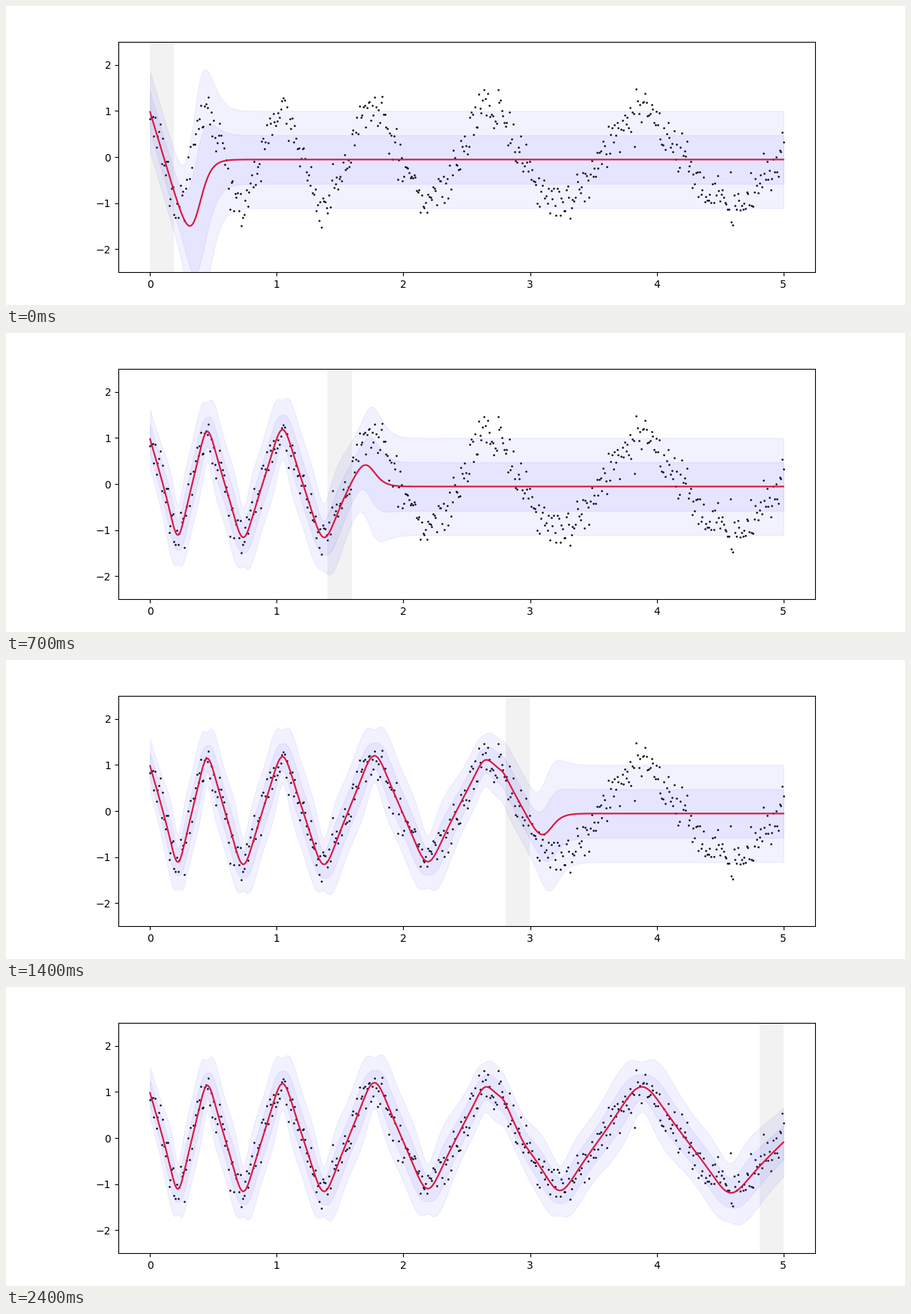
A matplotlib script that plays this animation: 1200 by 400 pixels, repeating every 2.5 s.

```python
import numpy as np
import matplotlib.pyplot as plt
from matplotlib.animation import FuncAnimation

FRAMES, BATCH = 25, 20

# Noisy hyperbolic chirp, 2.5 Hz slowing to 1 Hz at t = 2.5
rng = np.random.RandomState(1337)
x = np.linspace(0, 5, 500)
cycles = 2.5 * 5 / 3 * np.log(1 + x * 3 / 5)
y = np.cos(2 * np.pi * cycles) + 0.25 * rng.randn(500)

# Joints where one local linear expert hands over to the next
knots = np.array([
    (0, 0.98), (0.22, -1.11), (0.45, 1.14), (0.735, -1.16), (1.045, 1.18),
    (1.37, -1.16), (1.77, 1.2), (2.19, -1.1), (2.64, 1.1), (2.79, 0.82),
    (2.95, -0.1), (3.235, -1.14), (3.88, 1.11), (4.58, -1.19), (5, -0.09),
])
kx, ky = knots.T
length = np.diff(kx)
slope = np.diff(ky) / length
rate = 18 / (length[:-1] + length[1:])

PRIOR_MEAN, PRIOR_STD = -0.055, 0.527


def fit_slope(j, seen):
    """Ridge slope of the newest expert, anchored at its first joint."""
    use = (x >= kx[j]) & (np.arange(500) < seen)
    u, v = x[use] - kx[j], y[use] - ky[j]
    return u @ v / (u @ u + 0.025)


def predict(k):
    """Mean and deviation of the expert mixture after batch k."""
    seen = BATCH * (k + 1)
    edge = 0.2 * (k + 1)
    done = seen >= len(x)
    last = max(np.flatnonzero(kx[:-1] < edge - 0.1))

    noise = 0.27 + 0.165 * np.exp(-k / 5.5)
    log_w, means, stds = [np.zeros_like(x)], [], []
    for j in range(last + 1):
        a = fit_slope(j, seen) if j == last and not done else slope[j]
        means.append(ky[j] + a * (x - kx[j]))
        stds.append(noise + (0.09 if j == last and last else 0))
        if j:
            log_w.append(log_w[-1] + rate[j - 1] * (x - kx[j]))
    if not done:
        center = edge + 0.13 + 0.04 * np.exp(-k)
        log_w.append(log_w[-1] + 23 * (x - center))
        means.append(np.full_like(x, PRIOR_MEAN))
        stds.append(PRIOR_STD)

    log_w, means = np.array(log_w), np.array(means)
    w = np.exp(log_w - log_w.max(axis=0))
    w /= w.sum(axis=0)
    mean = (w * means).sum(axis=0)
    spread = np.array(stds)[:, None] ** 2 + (means - mean) ** 2
    return mean, np.sqrt((w * spread).sum(axis=0))


fig, ax = plt.subplots(figsize=(12, 4), dpi=100)


def draw(k):
    ax.clear()
    mean, std = predict(k)
    ax.scatter(x, y, s=0.75, color="k")
    ax.axvspan(x[BATCH * k], x[BATCH * k + BATCH - 1],
               facecolor="grey", alpha=0.1)
    ax.plot(x, mean, color="crimson")
    for c in (1, 2):
        ax.fill_between(x, mean - c * std, mean + c * std,
                        color="b", alpha=0.05)
    ax.set_xlim(-0.25, 5.25)
    ax.set_ylim(-2.5, 2.5)
    return ax.get_children()


anim = FuncAnimation(fig, draw, frames=FRAMES, interval=100,
                     init_func=lambda: draw(0), repeat=True)
plt.show()
```
